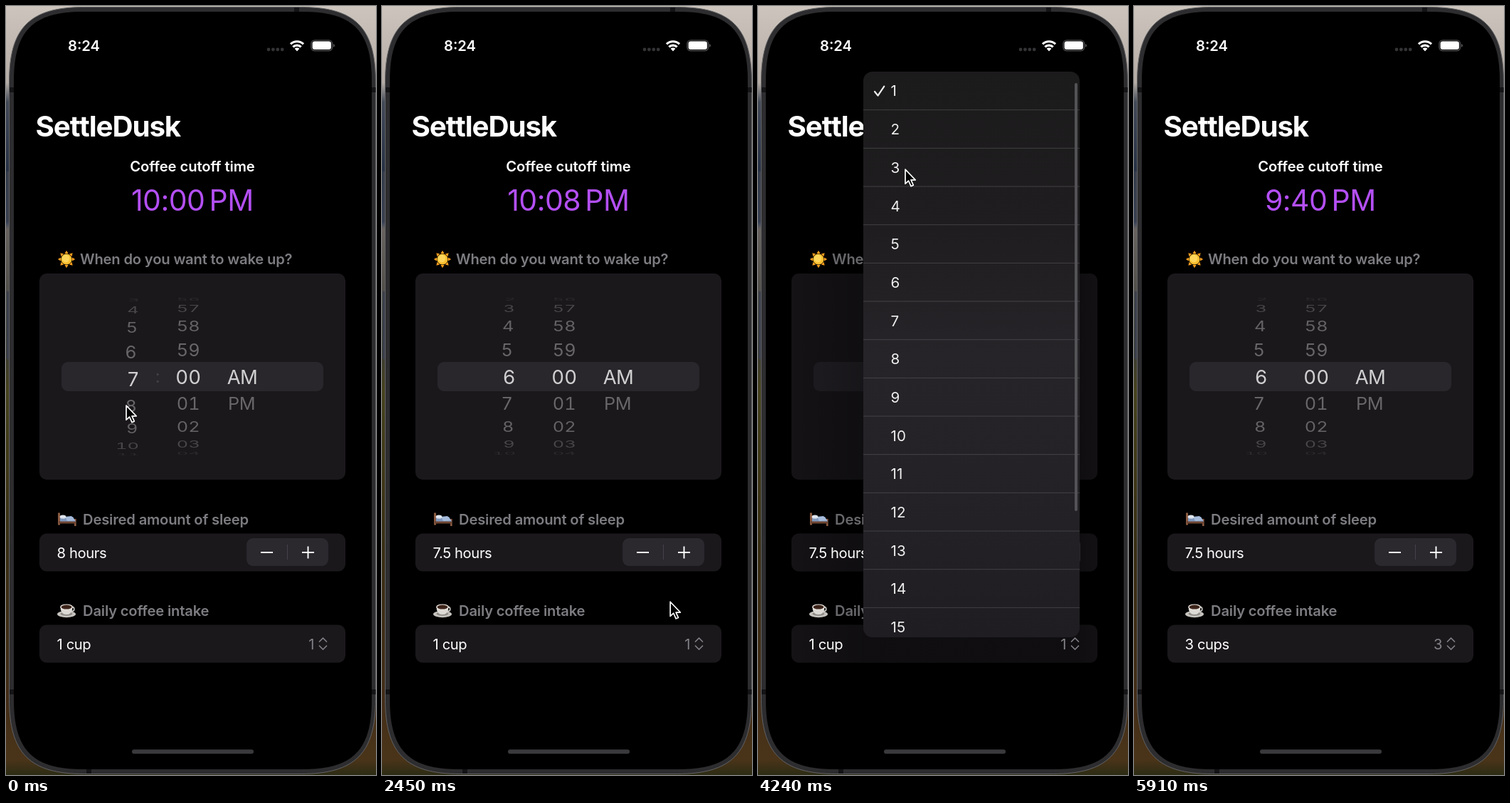
Write an HTML page that moves like this. It is 520 px wide and 1078 px high and loops after 5.94 s.

```html
<!DOCTYPE html>
<html lang="en">
<head>
<meta charset="utf-8">
<title>Sleep planner</title>
<style>
  html, body { margin: 0; width: 520px; height: 1078px; overflow: hidden; background: #000; }
  svg { display: block; font-family: Inter, "Open Sans", sans-serif; }
  .wheel { font-variant-numeric: tabular-nums; }
  .head { font-weight: 600; fill: #7d7c81; letter-spacing: -.18px; }
  .sub { font-weight: 600; fill: #fff; letter-spacing: -.05px; }
  .row { letter-spacing: -.38px; fill: #fff; }
</style>
</head>
<body>
<svg id="stage" width="520" height="1078" viewBox="0 0 520 1078">
  <defs>
    <linearGradient id="photo" x1="0" y1="0" x2="0" y2="1">
      <stop offset="0" stop-color="#cdc5bd"/>
      <stop offset=".1" stop-color="#b5aca5"/>
      <stop offset=".125" stop-color="#424a58"/>
      <stop offset=".21" stop-color="#283246"/>
      <stop offset=".28" stop-color="#33405a"/>
      <stop offset=".29" stop-color="#67625f"/>
      <stop offset=".45" stop-color="#3c3c34"/>
      <stop offset=".5" stop-color="#46421c"/>
      <stop offset=".7" stop-color="#382e12"/>
      <stop offset=".9" stop-color="#432d17"/>
      <stop offset=".98" stop-color="#4a3419"/>
      <stop offset="1" stop-color="#2c2c14"/>
    </linearGradient>
    <linearGradient id="glass" x1="0" y1="0" x2="0" y2="1">
      <stop offset="0" stop-color="#1c1b1c"/>
      <stop offset=".28" stop-color="#1f1d1f"/>
      <stop offset=".5" stop-color="#262428"/>
      <stop offset=".8" stop-color="#232125"/>
      <stop offset="1" stop-color="#1f1d21"/>
    </linearGradient>
    <linearGradient id="shade" gradientUnits="userSpaceOnUse" x1="47" y1="0" x2="477" y2="0">
      <stop offset="0" stop-opacity=".24"/>
      <stop offset=".23" stop-opacity=".44"/>
      <stop offset=".94" stop-opacity=".44"/>
      <stop offset="1" stop-opacity=".32"/>
    </linearGradient>
    <clipPath id="menuClip"><rect id="clipBox" rx="13"/></clipPath>
  </defs>

  <rect width="520" height="1078" fill="url(#photo)"/>
  <path d="M2.5 232V303M2.5 400V495" stroke="#3a3f4c" stroke-width="3"/>
  <path id="body" fill="#2d2d2f" stroke="#626265"/>
  <path d="M405 5h7M113 1073h7M8 114v7M8 958v7M516.5 114v7M516.5 958v7" stroke="#141416" stroke-width="6"/>
  <path id="screen"/>

  <g id="status" fill="#fff">
    <g fill="#343436">
      <circle cx="369" cy="61" r="2.4"/><circle cx="375.4" cy="61" r="2.4"/>
      <circle cx="381.8" cy="61" r="2.4"/><circle cx="388.2" cy="61" r="2.4"/>
    </g>
    <g fill="none" stroke="#fff" stroke-width="3.1">
      <path d="M400 53.4a13 13 0 0 1 18 0"/>
      <path d="M403.3 57.4a8.2 8.2 0 0 1 11.4 0"/>
    </g>
    <path d="M409 63.4l-3.4-3.6a4.9 4.9 0 0 1 6.8 0z"/>
    <rect x="429" y="48" width="29.5" height="14.6" rx="4.6" fill="none" stroke="#5c5c5f" stroke-width="1.2"/>
    <rect x="430.6" y="49.6" width="26.3" height="11.4" rx="3.2"/>
    <path d="M460 53v4.8q1.8-.8 1.8-2.4t-1.8-2.4z" fill="#5c5c5f"/>
  </g>

  <g fill="#1b181c">
    <rect x="47" y="375" width="430" height="289" rx="10"/>
    <rect x="47" y="739.5" width="430" height="53" rx="10"/>
    <rect x="47" y="867.5" width="430" height="53" rx="10"/>
  </g>
  <rect x="78" y="499" width="368" height="41" rx="9" fill="#29262c"/>
  <g id="dim" fill="url(#shade)">
    <rect x="47" y="375" width="430" height="289" rx="10"/>
    <rect x="47" y="739.5" width="430" height="53" rx="10"/>
    <rect x="47" y="867.5" width="430" height="53" rx="10"/>
  </g>

  <g transform="translate(85 355)">
    <g id="rays" fill="#f79b1e"></g>
    <circle r="7.6" fill="#ffbf2f"/><circle cx="-1" cy="-1" r="5.4" fill="#ffd65a"/>
  </g>
  <g transform="translate(72 709)">
    <path d="M1 1.5h3v17H1zM24 10h2.6v10H24z" fill="#8a5a41"/>
    <path d="M2 13h24v3.5H2z" fill="#6f4632"/>
    <path d="M4 8.5L22 7l4 6.5H4z" fill="#7f98bd"/>
    <path d="M11 7l9-1 5.5 6.5L14 13z" fill="#a5bbdb"/>
    <ellipse cx="8" cy="7" rx="4.4" ry="2.6" fill="#dfe5ee"/>
  </g>
  <g transform="translate(72 837)">
    <ellipse cx="13" cy="15.6" rx="13" ry="4.6" fill="#c6c3bf"/>
    <ellipse cx="13" cy="15" rx="8.5" ry="2.8" fill="#8f8c88"/>
    <circle cx="20.8" cy="8.4" r="3" fill="none" stroke="#d0cdc9" stroke-width="1.6"/>
    <path d="M4.5 5.4q0 10.6 8.5 10.6t8.5-10.6z" fill="#dddad6"/>
    <ellipse cx="13" cy="5.4" rx="8.8" ry="4" fill="#eeebe7"/>
    <ellipse cx="13" cy="5.6" rx="7.4" ry="3" fill="#3d241a"/>
  </g>
  <g id="heads"></g>

  <g id="wheels" class="wheel" fill="#fff"></g>

  <rect x="338" y="746" width="115" height="39" rx="9" fill="#2b282e"/>
  <path d="M395.5 755v21" stroke="#444147" stroke-width="1.2"/>
  <path d="M358 766h17M416 766h17M424.5 757.5v17" stroke="#fff" stroke-width="1.9"/>
  <path d="M440.5 891l5-5 5 5M440.5 897l5 5 5-5" fill="none" stroke="#828186" stroke-width="1.7" stroke-linecap="round" stroke-linejoin="round"/>
  <g id="labels"></g>
  <rect x="177" y="1042.3" width="171" height="6" rx="3" fill="#3a393c"/>

  <g id="menu">
    <rect id="menuBox" rx="13" fill="url(#glass)"/>
    <g clip-path="url(#menuClip)"><g id="rows"></g></g>
  </g>
  <path d="M195 50h133v10q0 18.5-18 18.5H213q-18 0-18-18.5z" fill="#000"/>

  <path id="cursor" d="M0 0V20.2L4.6 16 8 23.6 11.3 22.2 8 14.8H14.2Z" fill="#000" stroke="#fff" stroke-width="1.7" stroke-linejoin="round"/>
</svg>
<script>
const LOOP = 5940, PITCH = 53.67, MENU_W = 304;
const $ = id => document.getElementById(id);
const set = (el, attrs) => { for (const k in attrs) el.setAttribute(k, attrs[k]); };

function add(parent, tag, attrs) {
  const el = document.createElementNS('http://www.w3.org/2000/svg', tag);
  set(el, attrs);
  parent.appendChild(el);
  return el;
}

// Text whose capitals are centred on y.
function label(parent, str, x, y, size, attrs = {}) {
  const el = add(parent, 'text', { x, y: y + size * .364, 'font-size': size, ...attrs });
  el.textContent = str;
  return el;
}

// Rectangle whose corners ease into the sides over length e.
function smoothRect(x, y, w, h, e) {
  const k = e * .724;
  return `M${x + e} ${y}h${w - 2 * e}c${k} 0 ${e} ${e - k} ${e} ${e}v${h - 2 * e}` +
    `c0 ${k} ${k - e} ${e} ${-e} ${e}h${2 * e - w}c${-k} 0 ${-e} ${k - e} ${-e} ${-e}` +
    `v${2 * e - h}c0 ${-k} ${e - k} ${-e} ${e} ${-e}z`;
}

const ease = u => u * u * (3 - 2 * u);

// Rows are [time, ...values].
function track(rows, t) {
  let i = 0;
  while (i < rows.length - 1 && rows[i + 1][0] <= t) i++;
  const a = rows[i], b = rows[i + 1];
  if (!b || t < a[0]) return a.slice(1);
  const u = ease((t - a[0]) / (b[0] - a[0]));
  return a.slice(1).map((v, k) => v + (b[k + 1] - v) * u);
}

const step = (rows, t) => rows.filter(r => r[0] <= t).pop()[1];

const cursorPath = [
  [0, 169, 560], [430, 171, 602], [760, 171, 602], [1380, 366, 772],
  [2050, 366, 772], [2850, 444, 898], [3440, 444, 898], [3760, 247, 302],
  [4060, 207, 229], [4480, 207, 229], [4900, 545, 300]
];
const hourPath = [[0, 6.92], [430, 6.06], [600, 6]];
// left, top, right, bottom, box opacity, text opacity, scrollbar opacity
const menuPath = [
  [3430, 412, 878, 455, 906, 0, 0, 0],
  [3510, 345, 650, 454, 902, .85, .05, 0],
  [3600, 215, 250, 453, 895, 1, .4, 0],
  [3680, 152, 98, 453, 892, 1, .75, 0],
  [3760, 145, 77, 453, 890, 1, .85, 0],
  [3960, 148, 92, 452, 885, 1, .93, .9],
  [4460, 148, 92, 452, 885, 1, .93, .9],
  [4550, 200, 240, 452, 888, 1, .5, .2],
  [4640, 350, 680, 452, 894, .7, .1, 0],
  [4730, 420, 870, 452, 902, 0, 0, 0]
];
const clocks = [[0, '10:00'], [800, '9:38'], [1840, '10:08'], [4500, '9:40']];
const sleeps = [[0, '8 hours'], [1800, '7.5 hours']];
const cups = [[0, 1], [4480, 3]];

$('body').setAttribute('d', smoothRect(4.5, 1.5, 515, 1075, 105));
$('screen').setAttribute('d', smoothRect(11, 8, 503, 1062, 97));
for (let i = 0; i < 8; i++)
  add($('rays'), 'path', { d: 'M-2.6-8L0-12.2 2.6-8z', transform: `rotate(${i * 45})` });

label($('status'), '8:24', 87, 55.6, 20.2, { 'font-weight': 600 });
const labels = $('labels'), heads = $('heads');
label(labels, 'SettleDusk', 41.5, 168, 40.3, { 'font-weight': 700, fill: '#fff', 'letter-spacing': -1.1 });
label(labels, 'Coffee cutoff time', 262, 224.8, 20.2, { class: 'sub', 'text-anchor': 'middle' });
label(heads, 'When do you want to wake up?', 104, 355.1, 20.2, { class: 'head' });
label(heads, 'Desired amount of sleep', 108, 719.5, 20.2, { class: 'head' });
label(heads, 'Daily coffee intake', 108, 847.5, 20.2, { class: 'head' });

const clock = label(labels, '', 261.8, 272, 41, {
  'font-weight': 400, fill: '#b44ff5', 'text-anchor': 'middle', 'letter-spacing': -.5
});
const clockTime = add(clock, 'tspan', {});
add(clock, 'tspan', { dx: 6 }).textContent = 'PM';
const sleepText = label(labels, '', 71.5, 766.3, 20.2, { class: 'row' });
const cupText = label(labels, '', 71.5, 894.3, 20.2, { class: 'row' });
const cupCount = label(labels, '', 433, 894.3, 20.2, { class: 'row', style: 'fill:#828186', 'text-anchor': 'end' });

// Picker drum: each item sits on a cylinder, 20 degrees apart.
const fade = [[0, .78], [.35, .74], [.75, .34], [2, .32], [3, .2], [4, .08], [4.5, 0]];
function place(el, d, rightX, midX) {
  const k = Math.abs(d), near = k < .5, a = d * Math.PI / 9;
  const x = rightX ? (near ? 187.5 : 182.5 + 1.4 * k) : midX;
  const size = near ? 27.5 : 25.3;
  set(el, {
    'font-size': size, y: size * .364,
    transform: `translate(${x} ${519.5 + 110 * Math.sin(a)}) scale(1 ${Math.max(.02, Math.cos(a))})`,
    opacity: k < 4.5 ? track(fade, k)[0] : 0
  });
}
const wheels = $('wheels');
const hours = Array.from({ length: 12 }, (_, i) =>
  label(wheels, i + 1, 0, 0, 25, { 'text-anchor': 'end' }));
for (let d = -4; d <= 4; d++)
  place(label(wheels, String((60 + d) % 60).padStart(2, '0'), 0, 0, 25, { 'text-anchor': 'middle' }), d, false, 256.2);
['AM', 'PM'].forEach((s, d) =>
  place(label(wheels, s, 0, 0, 25, { 'text-anchor': 'middle', 'letter-spacing': -.6 }), d, false, 332 - d));
const colon = label(wheels, ':', 213, 519, 25, { 'text-anchor': 'middle' });

const rows = $('rows');
for (let i = 0; i < 15; i++) {
  const y = i * PITCH;
  label(rows, i + 1, 38.5, y + 27, 20.6, { fill: '#fff' });
  if (i) add(rows, 'path', { d: `M0 ${y}H${MENU_W}`, stroke: '#666468', 'stroke-width': 1, opacity: .55 });
}
add(rows, 'path', {
  d: 'M16 28l4.5 5.6 8.8-13', fill: 'none', stroke: '#fff', 'stroke-width': 2.2,
  'stroke-linecap': 'round', 'stroke-linejoin': 'round'
});
const bar = add(rows, 'rect', { x: 297, y: 16, width: 4, height: 600, rx: 2, fill: '#5e5c61' });

function draw(t) {
  const [hour] = track(hourPath, t);
  hours.forEach((el, i) => {
    const d = ((i + 1 - hour + 18) % 12) - 6;
    place(el, d, true);
  });
  colon.setAttribute('opacity', .12 * (1 - Math.min(1, t / 600)));

  clockTime.textContent = step(clocks, t);
  sleepText.textContent = step(sleeps, t);
  const n = step(cups, t);
  cupText.textContent = n + (n > 1 ? ' cups' : ' cup');
  cupCount.textContent = n;

  const [l, top, r, b, alpha, ink, scroll] = track(menuPath, t);
  const box = { x: l, y: top, width: r - l, height: b - top };
  set($('menuBox'), box);
  set($('clipBox'), box);
  $('menu').setAttribute('opacity', alpha);
  set(rows, { transform: `translate(${l} ${top}) scale(${(r - l) / MENU_W})`, opacity: ink });
  bar.setAttribute('opacity', scroll);
  $('dim').setAttribute('opacity', alpha);
  heads.setAttribute('opacity', 1 - .16 * alpha);

  const [x, y] = track(cursorPath, t);
  $('cursor').setAttribute('transform', `translate(${x} ${y})`);
}

const start = performance.now();
function tick(now) {
  draw(Math.max(0, now - start) % LOOP);
  requestAnimationFrame(tick);
}
draw(0);
requestAnimationFrame(tick);
</script>
</body>
</html>
```
